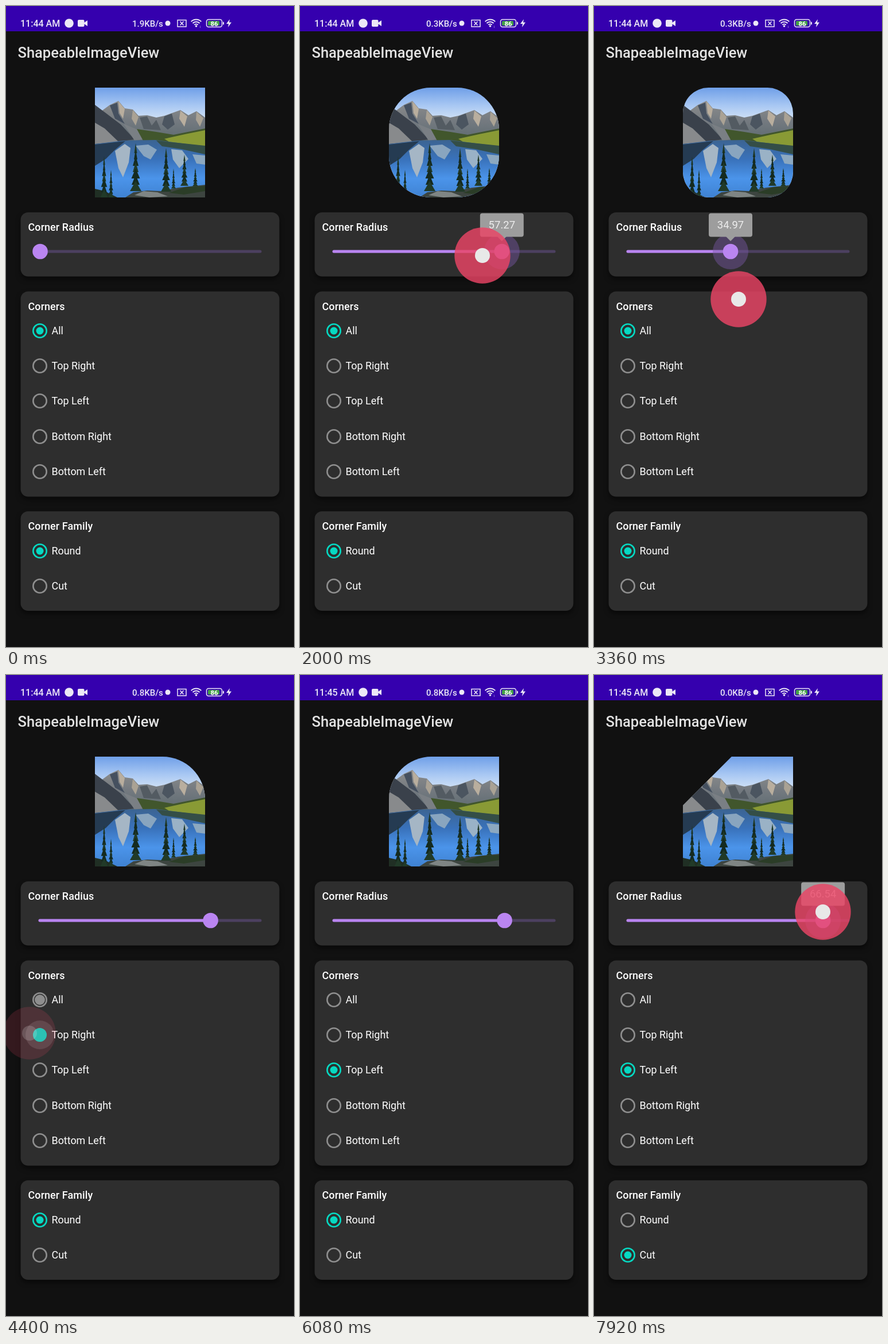
Recreate the animation shown at these times as an HTML page with a canvas. Size 502x1115 px, loop 8 s.

```html
<!DOCTYPE html>
<html lang="en">
<head>
<meta charset="utf-8">
<title>ShapeableImageView</title>
<style>
html, body { margin: 0; height: 100%; overflow: hidden; background: #111; }
canvas { display: block; }
</style>
</head>
<body>
<canvas width="502" height="1115"></canvas>
<script>
const ctx = document.querySelector('canvas').getContext('2d');
const LOOP = 8000, STEP = 80;
const TEAL = '#06d9c2', GRAY = '#8e8e8e', PURPLE = '#ba85f1';
const REST = 58.2; // slider value between the two drags

// Drags: [time, finger x, finger y, slider value]
const drags = [
  [[320, 70, 432, 0], [400, 72, 432, 2], [1000, 460, 436, 75], [1200, 422, 434, 73],
   [1510, 71, 430, 2.4], [1860, 410, 432, 68.5], [2000, 318, 434, 57.27], [2240, 77, 440, 4],
   [2640, 436, 455, 73.5], [3120, 85, 490, 5.5], [3360, 252, 510, 34.97], [3580, 396, 515, 65.8],
   [3760, 356, 508, REST]],
  [[6960, 345, 430, 56], [7120, 340, 430, 55.6], [7360, 219, 428, 33.7], [7560, 70, 426, 2.5],
   [7840, 402, 414, 66.9], [7920, 399, 412, 66.54]]
];

// Taps: the radio row is checked when the finger lifts
const taps = [
  { down: 4160, up: 4320, x: 41, y: 623, row: 626 },
  { down: 5120, up: 5280, x: 54, y: 690, row: 687 },
  { down: 6320, up: 6480, x: 58, y: 1015, row: 1009 }
];

// Radios: checked from `on` until `off`
const radios = [
  { label: 'All', y: 565, on: -1e4, off: 4320 },
  { label: 'Top Right', y: 626, on: 4320, off: 5280 },
  { label: 'Top Left', y: 687, on: 5280, off: 1e5 },
  { label: 'Bottom Right', y: 749, on: 1e5, off: 1e5 },
  { label: 'Bottom Left', y: 810, on: 1e5, off: 1e5 },
  { label: 'Round', y: 948, on: -1e4, off: 6480 },
  { label: 'Cut', y: 1009, on: 6480, off: 1e5 }
];

const clamp = (v, lo = 0, hi = 1) => Math.min(hi, Math.max(lo, v));

// Smooth curve through the keys that comes to rest at each turning point
function track(keys, t, col) {
  if (t <= keys[0][0]) return keys[0][col];
  const i = keys.findIndex(k => k[0] > t);
  if (i < 0) return keys[keys.length - 1][col];
  const slope = j => {
    const a = keys[j - 1], b = keys[j], c = keys[j + 1];
    if (!a || !c || (b[col] - a[col]) * (c[col] - b[col]) <= 0) return 0;
    return (c[col] - a[col]) / (c[0] - a[0]);
  };
  const a = keys[i - 1], b = keys[i], d = b[0] - a[0], u = (t - a[0]) / d;
  const s = u * u * (3 - 2 * u);
  return a[col] + (b[col] - a[col]) * s
    + d * u * (1 - u) * ((1 - u) * slope(i - 1) - u * slope(i));
}

function text(str, x, y, size, weight = 400, color = '#fff', align = 'left', spacing = 0) {
  ctx.font = `${weight} ${size}px Roboto, sans-serif`;
  ctx.textAlign = align;
  ctx.letterSpacing = spacing + 'px';
  ctx.fillStyle = color;
  ctx.fillText(str, x, y);
}
function disc(x, y, r, color) {
  ctx.fillStyle = color;
  ctx.beginPath();
  ctx.arc(x, y, r, 0, 7);
  ctx.fill();
}
function box(x, y, w, h, r, color) {
  ctx.fillStyle = color;
  ctx.beginPath();
  ctx.roundRect(x, y, w, h, r);
  ctx.fill();
}
function poly(color, ...p) {
  ctx.fillStyle = color;
  ctx.beginPath();
  for (let i = 0; i < p.length; i += 2) ctx.lineTo(p[i], p[i + 1]);
  ctx.fill();
}
function line(color, width, ...p) {
  ctx.strokeStyle = color;
  ctx.lineWidth = width;
  ctx.beginPath();
  for (let i = 0; i < p.length; i += 2) ctx.lineTo(p[i], p[i + 1]);
  ctx.stroke();
}
function shade(y0, y1, ...colors) {
  const g = ctx.createLinearGradient(0, y0, 0, y1);
  colors.forEach((c, i) => g.addColorStop(i / (colors.length - 1), c));
  return g;
}

function statusBar(t) {
  const ink = '#ece8f6';
  box(0, 0, 502, 44, 0, '#3500ae');
  text(t < 5200 ? '11:44 AM' : '11:45 AM', 25, 36, 16, 500, ink);
  disc(110, 30, 7.8, ink);
  box(125, 24, 11.5, 12, 2, ink);
  poly(ink, 136, 29, 142, 25, 142, 35, 136, 31);
  const speed = t < 1200 ? '1.9' : t < 3920 ? '0.3' : t < 6640 ? '0.8' : '0.0';
  text(speed + 'KB/s', 220, 36, 15, 500, ink);
  disc(282, 30, 4.5, ink);

  ctx.strokeStyle = ink;
  ctx.lineWidth = 1.5;
  ctx.strokeRect(299, 24.5, 15, 11.5);
  line(ink, 1.5, 303.5, 27, 309.5, 33.5);
  line(ink, 1.5, 309.5, 27, 303.5, 33.5);
  ctx.lineWidth = 2;
  for (const r of [4.5, 8.5, 12.5]) {
    ctx.beginPath();
    ctx.arc(331.5, 36, r, -2.35, -0.79);
    ctx.stroke();
  }
  disc(331.5, 35, 1.8, ink);
  if (t < 3920 || t > 4960) text('↕', 337, 38, 6, 400, ink);

  ctx.lineWidth = 1.5;
  ctx.beginPath();
  ctx.roundRect(349.5, 23.5, 27, 13, 3.5);
  ctx.stroke();
  box(352, 26, 20, 8, 1.5, '#43a047');
  box(378, 27.5, 2, 5, 1, ink);
  text('86', 363, 34.5, 11.5, 700, '#fff', 'center');
  poly(ink, 390, 23, 384, 31, 388, 31, 387, 37, 393, 28.5, 389, 28.5);
}

function tree(x, top, bottom, w) {
  const n = 7, h = (bottom - top) / n;
  for (let i = 0; i < n; i++) {
    const y = top + i * h, half = w * (i + 2) / (n + 1) * (i % 2 ? 0.8 : 1);
    poly(i % 3 ? '#152b20' : '#213a28', x, y - h * 0.5, x + half, y + h * 1.1, x - half, y + h * 1.1);
  }
}

function photo(v, t) {
  const x = 155, y = 142, w = 192, h = 191, r = v * 1.275;
  const all = t < 4320, right = !all && t < 5280;
  ctx.save();
  ctx.beginPath();
  if (t < 6480) ctx.roundRect(x, y, w, h, all ? r : right ? [0, r, 0, 0] : [r, 0, 0, 0]);
  else [[x + r, y], [x + w, y], [x + w, y + h], [x, y + h], [x, y + r]].forEach(p => ctx.lineTo(...p));
  ctx.clip();

  box(x, y, w, h, 0, shade(142, 205, '#6f9fe8', '#a9c8f3', '#dce9f6'));
  // mountains
  poly(shade(165, 235, '#8d8d8c', '#747a80', '#5d6a70'), 155, 172, 166, 183, 181, 172, 196, 165, 207, 178,
    221, 180, 231, 191, 246, 190, 262, 194, 276, 191, 290, 186, 304, 181, 318, 190, 332, 183, 347, 194, 347, 240, 155, 240);
  poly('#b9ae9e', 196, 166, 207, 179, 204, 196, 198, 186);
  poly('#b9ae9e', 304, 182, 316, 192, 311, 210, 302, 196);
  poly('#aaa294', 221, 181, 231, 193, 226, 208, 219, 196);
  poly('#aaa294', 332, 184, 344, 195, 338, 210, 331, 198);
  poly('#45505f', 181, 173, 194, 168, 196, 187, 207, 205, 190, 196);
  poly('#4b5560', 276, 192, 289, 187, 294, 206, 282, 215, 272, 206);
  poly('#535b62', 233, 194, 246, 192, 254, 208, 262, 198, 270, 216, 240, 214);
  // slopes and forest
  poly('#3a414b', 155, 172, 175, 187, 200, 206, 224, 232, 155, 242);
  poly('#888a8c', 155, 203, 172, 213, 196, 236, 155, 240);
  poly('#7a7f84', 205, 205, 232, 216, 248, 231, 224, 234);
  poly('#41562c', 228, 214, 262, 219, 292, 224, 347, 213, 347, 240, 240, 236);
  poly('#899a35', 347, 216, 312, 223, 276, 231, 290, 240, 347, 244);
  // lake with reflections
  poly(shade(234, 333, '#3b6493', '#3972bb', '#4b94ea', '#3f82d2'), 155, 240, 205, 234, 260, 233, 347, 244, 347, 333, 155, 333);
  poly('#253b52', 155, 241, 208, 235, 190, 250, 174, 266, 155, 278);
  poly('#a5b6c5', 190, 252, 207, 240, 217, 247, 214, 272, 204, 298, 196, 282);
  poly('#89a5bf', 226, 243, 248, 241, 263, 250, 252, 267, 240, 261);
  poly('#9ab2c6', 288, 249, 307, 251, 318, 266, 302, 282, 291, 267);
  poly('#344e47', 262, 234, 347, 243, 347, 258, 306, 249, 272, 244);
  poly('#8ca8c0', 325, 258, 347, 260, 347, 276, 332, 274);
  // shore
  poly('#202f24', 155, 318, 172, 322, 194, 333, 155, 333);
  poly('#3d4540', 208, 333, 222, 324, 246, 321, 270, 322, 300, 316, 347, 311, 347, 333);
  poly('#7f8584', 224, 329, 240, 322, 264, 324, 282, 331, 250, 333);
  poly('#2b3d27', 284, 325, 312, 315, 347, 313, 347, 322, 310, 328);
  tree(171, 266, 333, 7);
  tree(183, 288, 333, 5);
  tree(226, 244, 321, 10);
  tree(279, 252, 322, 9);
  tree(292, 285, 317, 4);
  tree(311, 262, 312, 7);
  tree(330, 284, 313, 5);
  ctx.restore();
}

function card(title, y, h) {
  ctx.save();
  ctx.shadowColor = 'rgba(0,0,0,.5)';
  ctx.shadowBlur = 9;
  ctx.shadowOffsetY = 5;
  box(25.5, y, 451, h, 13, '#2e2e2e');
  ctx.restore();
  text(title, 38.5, y + 32, 17.9, 500, '#fff', 'left', 0.13);
}

function slider(v, pressed) {
  const x = 59.5 + v * 5.1045, y = 427;
  ctx.lineCap = 'round';
  line('#4c4060', 5, 59, y, 443, y);
  if (v > 0) line(PURPLE, 5, 59, y, x, y);
  ctx.lineCap = 'butt';
  if (pressed) disc(x, y, 31, 'rgba(120,88,165,.45)');
  disc(x, y, 13.3, PURPLE);
  if (!pressed) return;
  box(x - 38, 360.5, 76, 41, 4, '#9d9d9d');
  poly('#9d9d9d', x - 8, 401, x + 8, 401, x, 409);
  text(v.toFixed(2), x, 387, 18.5, 400, '#ededed', 'center');
}

function radio({ label, y, on, off }, t) {
  const x = 59, checked = t >= on && t < off;
  const p = checked ? clamp((t - on) / 160) : clamp((t - off) / 320);
  const fill = 1 - Math.abs(2 * p - 1);
  const color = checked ? TEAL : GRAY;
  const dotted = checked ? p >= 0.5 : t >= off && p < 0.5;
  const thick = dotted ? 2.6 : 2.6 + 10.4 * fill;
  const outer = 13 - (checked ? fill : 0);
  ctx.strokeStyle = color;
  ctx.lineWidth = thick;
  ctx.beginPath();
  ctx.arc(x, y, Math.max(outer - thick / 2, 0.1), 0, 7);
  ctx.stroke();
  if (dotted) disc(x, y, 6.5 + 5 * fill, color);
  text(label, 79.5, y + 6.3, 17.9);
}

function finger(x, y, alpha) {
  if (alpha <= 0) return;
  ctx.globalAlpha = alpha;
  disc(x, y, 45 + 3.7 * alpha, 'rgba(236,68,102,.81)');
  disc(x, y, 13, '#e8e8e8');
  ctx.globalAlpha = 1;
}

function draw(t) {
  const drag = drags.find(k => t >= k[0][0] && t <= k[k.length - 1][0]);
  const value = drag ? track(drag, t, 3) : t < 320 ? 0 : REST;

  box(0, 0, 502, 1115, 0, '#111');
  statusBar(t);
  text('ShapeableImageView', 20.5, 90, 25.5, 500, '#e2e2e2');
  photo(value, t);
  card('Corner Radius', 359, 111.5);
  card('Corners', 496.5, 357);
  card('Corner Family', 879, 173);
  slider(value, drag);

  for (const tap of taps) {
    const fade = clamp(1 - (t - tap.up) / 300);
    if (t >= tap.down && fade) {
      const grow = clamp((t - tap.down + STEP) / 240);
      disc(59, tap.row, 25 * grow, `rgba(255,255,255,${0.16 * fade})`);
    }
  }
  radios.forEach(r => radio(r, t));

  for (const keys of drags) {
    const end = keys[keys.length - 1][0];
    if (t >= keys[0][0]) finger(track(keys, t, 1), track(keys, t, 2), clamp(1 - (t - end) / 100));
  }
  for (const tap of taps) {
    if (t >= tap.down) finger(tap.x, tap.y, clamp(1 - (t - tap.up) / 100));
  }
}

function frame() {
  draw(Math.floor(performance.now() % LOOP / STEP) * STEP);
  requestAnimationFrame(frame);
}
frame();
</script>
</body>
</html>
```
